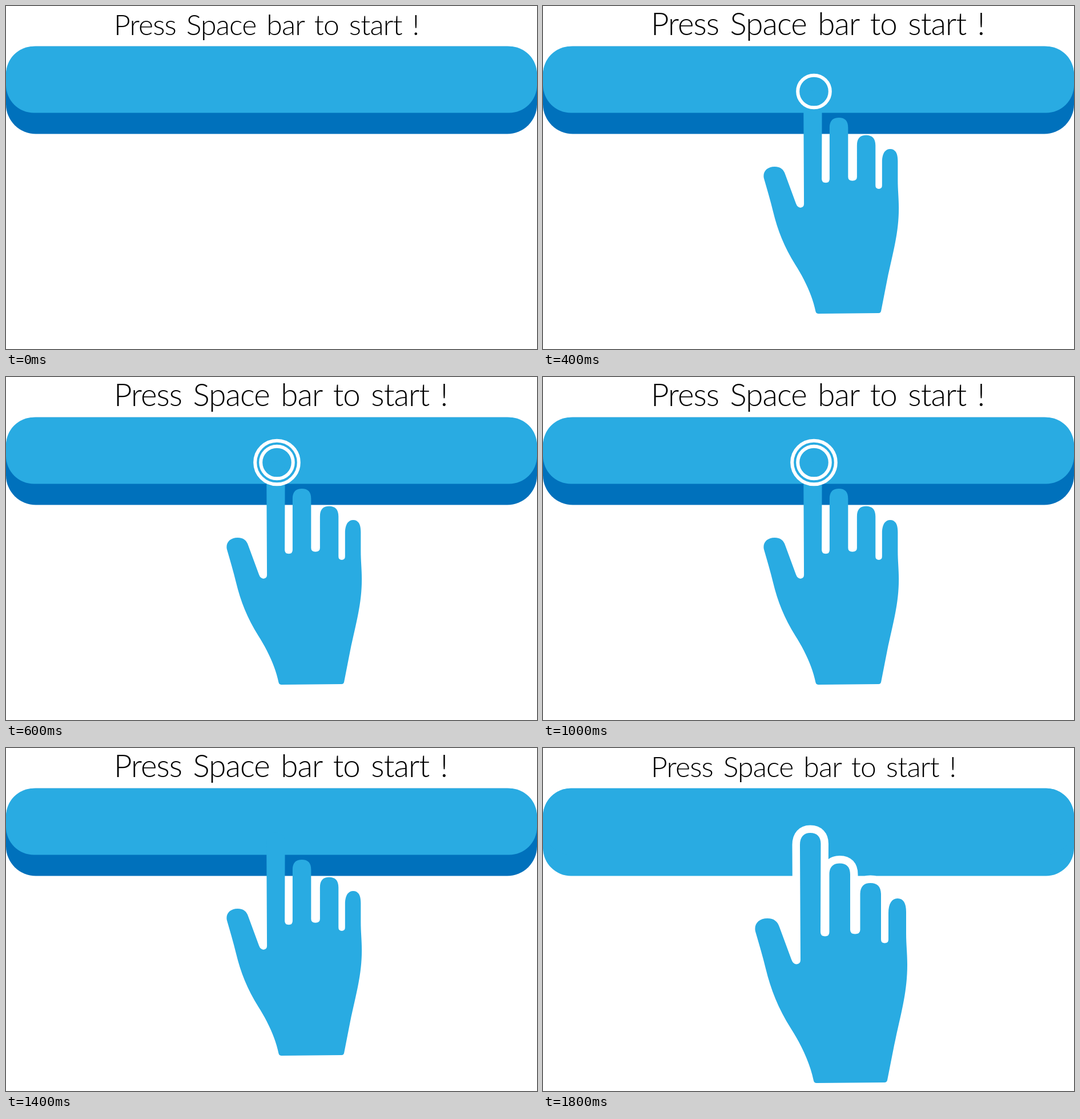
Animation of 930 by 602 pixels, one loop 2000 ms. Source, as an HTML page:

```html
<!DOCTYPE html>
<html lang="en">
<head>
<meta charset="utf-8">
<title>Press Space bar to start</title>
<style>
  html, body { margin: 0; height: 100%; overflow: hidden; background: #fff; }
  svg { display: block; width: 100%; height: 100%; }
  text { font-family: Lato, sans-serif; font-weight: 300; letter-spacing: -.017em; word-spacing: .1em; }
  .light { fill: #29abe2; }
  #hand { stroke: #fff; stroke-linejoin: round; paint-order: stroke; }
  #rings { fill: none; stroke: #fff; stroke-width: 6; }
</style>
</head>
<body>
<svg viewBox="0 0 930 602">
  <text id="label" x="189" y="51">Press Space bar to start !</text>
  <rect id="side" y="70.7" width="930" height="153.7"/>
  <rect class="light" y="70.7" width="930" height="116.8" rx="49"/>
  <path id="hand" class="light" d="
    M451 372 L450 170 C450 156 457 149 468 149 C480 149 486.500 156 486.500 168
    L486 323 Q486 330.500 494 330.500 Q501.500 330.500 501.500 323
    V222 C501.500 209 508 202.500 519.500 202.500 C532 202.500 538 209 538 222
    V319 Q538 326.500 546.500 326.500 Q555.500 326.500 555.500 319
    V257 C555.500 243 562 237 573.500 237 C586 237 592 244 592 257
    V336 Q592 342.500 598.500 342.500 Q605 342.500 605 336
    V290 C605 273 611 264 621 264 C631 264 636 272 636 288
    V325 C636 345 638 360 638 380 C638 430 627 465 615 522
    L603 583 Q602 587 598 587 L479 588 Q475 588 474 584
    C467 550 450 517 434 492 C412 457 399 424 390 387
    C385 366 378 343 372 322 C369 309 378 299 393 299 C405 299 411 305 414 314
    L435 371 Q438 379.500 444 379.500 Q451 379 451 372 Z"/>
  <g id="rings">
    <circle cx="474.5" cy="150" r="28.3"/>
    <circle cx="474.5" cy="150" r="38.3"/>
    <circle cx="474.5" cy="150" r="53.3"/>
  </g>
</svg>
<script>
  const STEP = 200, STEPS = 10;
  const [label, side, hand, rings] = ['label', 'side', 'hand', 'rings']
    .map(id => document.getElementById(id));
  const show = (el, visible) => el.setAttribute('visibility', visible ? 'visible' : 'hidden');

  function draw(now) {
    const step = Math.floor(now / STEP) % STEPS;
    const tapping = step >= 2 && step <= 7;
    const flat = step >= 8;
    const ringCount = 3 - Math.abs(step - 4);

    label.setAttribute('font-size', step % 9 ? 54.7 : 50);
    side.setAttribute('fill', flat ? '#29abe2' : '#0071bc');
    side.setAttribute('rx', flat ? 49 : 52);
    show(hand, step > 0);
    hand.setAttribute('stroke-width', tapping ? 0 : 27);
    hand.setAttribute('transform', tapping ? 'translate(56.6 15.4) scale(.888 .892)' : '');
    [...rings.children].forEach((ring, i) => show(ring, i < ringCount));
    requestAnimationFrame(draw);
  }
  draw(0);
</script>
</body>
</html>
```
